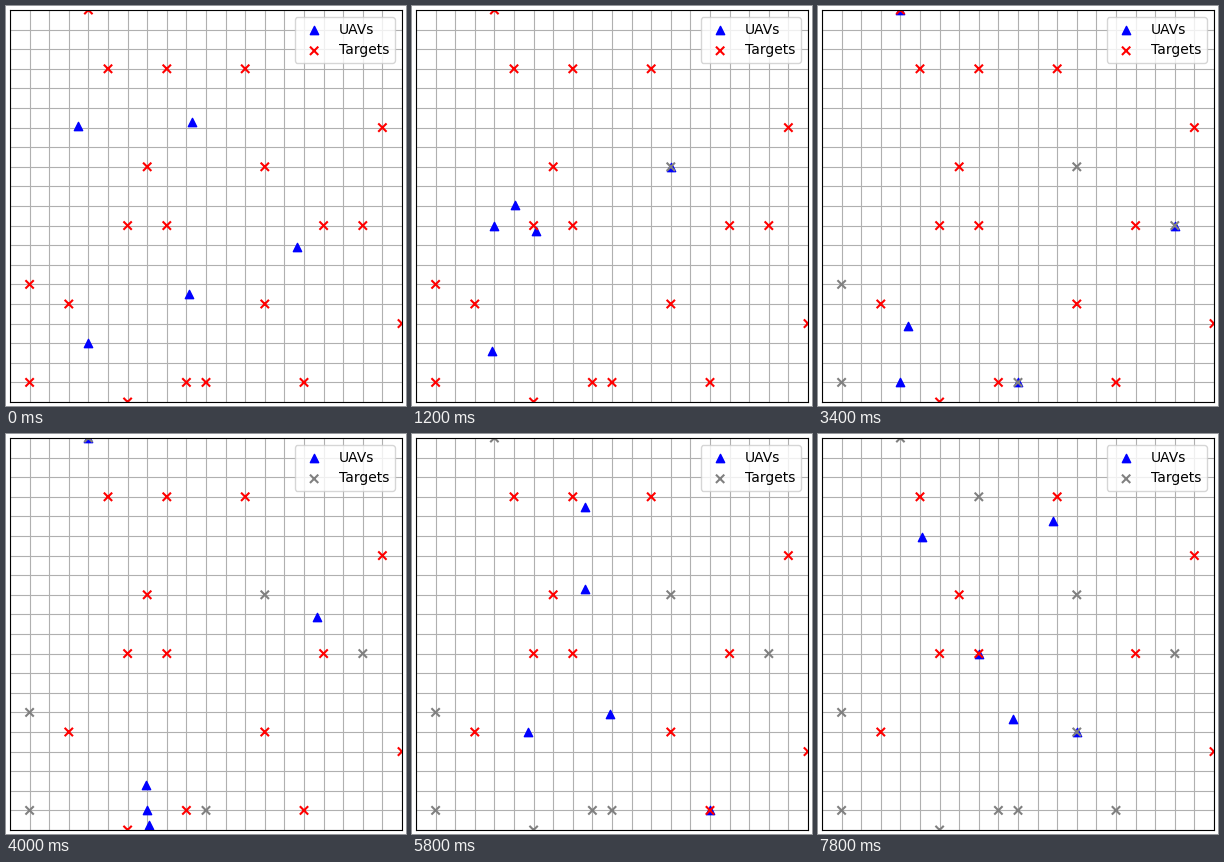
A matplotlib script that plays this animation: 400 by 400 pixels, repeating every 8 s.

```python
import math

import matplotlib.pyplot as plt
import numpy as np
from matplotlib.animation import FuncAnimation

STEPS = 40
SIZE = 20

# Each drone: start point, then the targets it visits as x, y[, steps of work]
ROUTES = [
    [(4, 3), (4, 20, 3), (13, 5)],
    [(3.45, 14.08), (10, 1, 2), (6, 0, 2), (5, 17)],
    [(9.29, 14.29), (1, 6), (9, 1), (12, 17)],
    [(14.64, 7.9), (13, 12), (18, 9, 5), (8, 17), (8, 9)],
    [(9.13, 5.5), (1, 1, 4), (15, 1, 4), (6, 9)],
]
UNVISITED = [(19, 14), (7, 12), (16, 9), (3, 5), (20, 4)]


def fly(start, *stops):
    """Positions at one unit per step, and the step each stop is finished."""
    path, done = [np.array(start, float)], {}
    for x, y, *work in stops:
        here, goal = path[-1], np.array([x, y], float)
        dist = math.dist(here, goal)
        hops = math.ceil(dist - 1e-6)
        path += [here + (goal - here) * min(k / dist, 1)
                 for k in range(1, hops + 1)]
        path += [goal] * sum(work or [1])
        done[x, y] = len(path) - 1
    path += [path[-1]] * STEPS
    return path[:STEPS], done


paths, finished = [], {}
for route in ROUTES:
    path, done = fly(*route)
    paths.append(path)
    finished.update(done)
paths = np.array(paths)
targets = [*finished, *UNVISITED]

fig, ax = plt.subplots(figsize=(4, 4), dpi=100)
fig.subplots_adjust(left=0.01, right=0.99, bottom=0.01, top=0.99)
ax.set(xlim=(0, SIZE), ylim=(0, SIZE),
       xticks=range(SIZE + 1), yticks=range(SIZE + 1))
ax.tick_params(length=0, labelbottom=False, labelleft=False)
ax.set_axisbelow(True)
ax.grid(True)

uavs = ax.scatter(*paths[:, 0].T, c="blue", marker="^", label="UAVs")
marks = ax.scatter(*zip(*targets), c=["red"] * len(targets), marker="x",
                   label="Targets")
legend = ax.legend(loc="upper right")
target_key = legend.legend_handles[1]


def update(step):
    uavs.set_offsets(paths[:, step])
    colors = ["gray" if step >= finished.get(t, STEPS) else "red"
              for t in targets]
    # The legend key shows the first target's state
    for artist in (marks, target_key):
        artist.set_color(colors)
    return uavs, marks, target_key


anim = FuncAnimation(fig, update, frames=STEPS, interval=200, repeat=True,
                     repeat_delay=0, blit=False)
plt.show()
```
